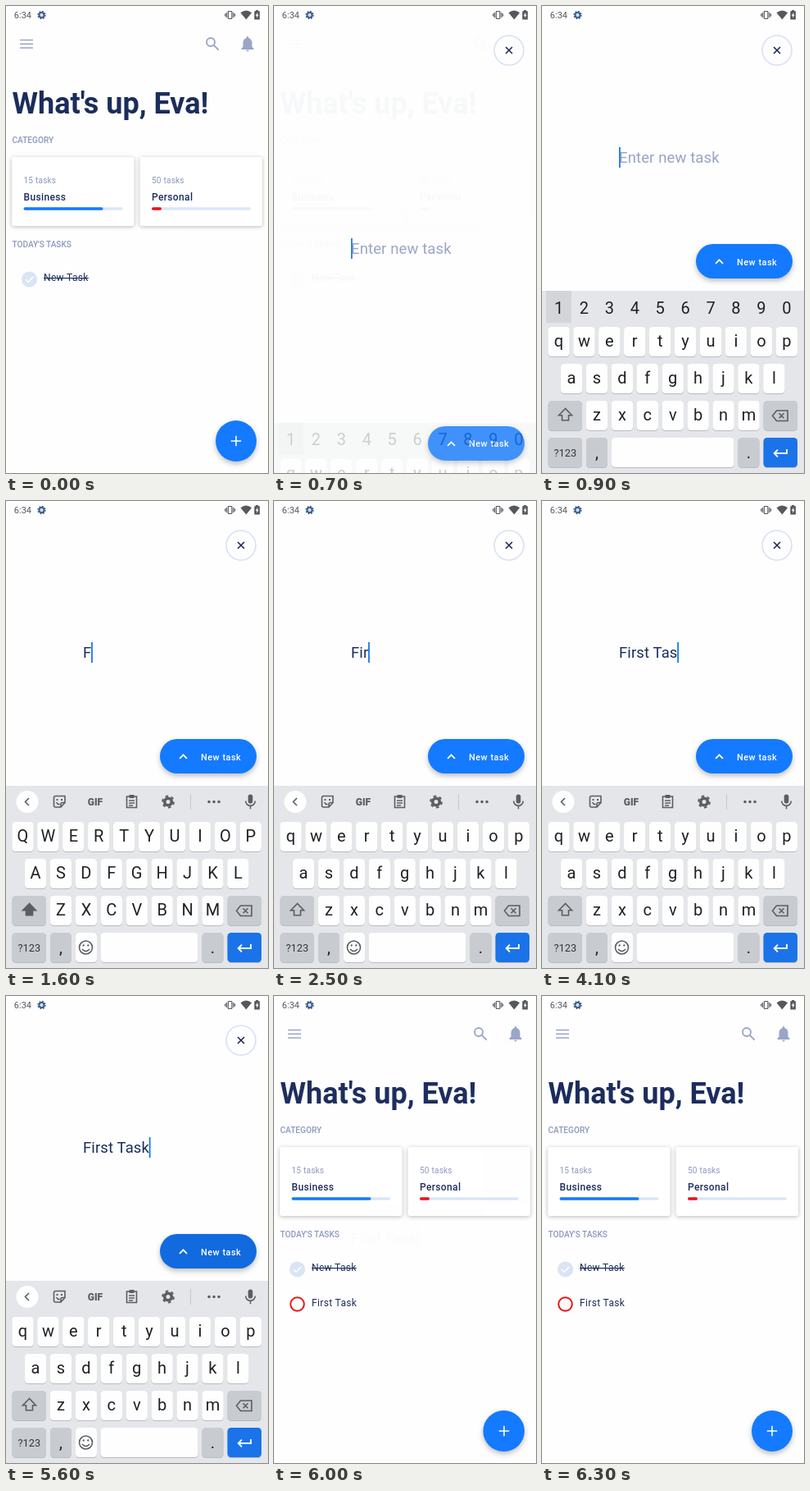
Write an HTML page that moves like this. It is 320 by 569 pixels and loops after 8 s.

```html
<!DOCTYPE html>
<html lang="en">
<head>
<meta charset="utf-8">
<title>Task list</title>
<style>
  html, body { margin: 0; height: 100%; overflow: hidden; background: #fdfefd; }
  svg { display: block; width: 100vw; height: 100vh; font-family: Roboto, sans-serif; }
  text { white-space: pre; }
  .line { fill: none; stroke-width: 1.6; }
  .round { stroke-linecap: round; }
  .navy { fill: #1c2c5c; }
  .muted { fill: #8c99bd; }
  .label { font-size: 10.1px; font-weight: 500; }
  .count { font-size: 10.1px; letter-spacing: .2px; }
  .item { font-size: 12px; letter-spacing: .35px; }
  .entry { font-size: 18.5px; letter-spacing: .12px; }
  .mid { text-anchor: middle; }
  .key { font-size: 20px; fill: #1f2124; text-anchor: middle; }
  .hint { font-size: 8.5px; fill: #55585c; text-anchor: middle; }
  .tool { fill: none; stroke: #5a5e63; stroke-width: 1.6; }
  .solid { fill: #5a5e63; }
  .card { fill: #fff; filter: drop-shadow(0 1px 2.5px rgba(0, 0, 0, .28)); }
  #fab { filter: drop-shadow(0 3px 3px rgba(0, 0, 0, .25)); }
</style>
</head>
<body>
<svg viewBox="0 0 320 569" preserveAspectRatio="none">
  <rect width="320" height="569" fill="#fdfefd"/>

  <g id="home">
    <path class="line" stroke="#9aa5c8" d="M17 41.5h16M17 46.3h16M17 51h16"/>
    <g class="line" stroke="#9aa5c8" style="stroke-width:1.9">
      <circle cx="250" cy="44" r="5"/><path d="M253.7 47.7l6 6"/>
    </g>
    <path fill="#9aa5c8" d="M287.5 53v-1.3l2-2v-5c0-3 1.700-5.200 4.200-5.800v-.6a1.300 1.300 0 0 1 2.600 0v.6c2.500.6 4.200 2.800 4.200 5.800v5l2 2V53zM293.200 53.800h3.600a1.800 1.800 0 0 1-3.600 0z"/>
    <text class="navy" x="7.500" y="131" font-size="36" font-weight="700">What's up, Eva!</text>
    <text class="muted label" x="7.500" y="167">CATEGORY</text>
    <g id="cards"></g>
    <text class="muted label" x="7.500" y="294">TODAY'S TASKS</text>
    <circle cx="28.500" cy="333" r="9.500" fill="#dae4f5"/>
    <path class="line" stroke="#fff" d="M24 333.200l3.200 3.200 6-6.400"/>
    <text class="navy item" x="46" y="335.300" text-decoration="line-through">New Task</text>
    <g id="added">
      <circle class="line" cx="28.500" cy="375.500" r="8.300" stroke="#ec1111" style="stroke-width:2"/>
      <text class="navy item" x="46" y="378">First Task</text>
    </g>
  </g>

  <g id="page">
    <rect width="320" height="569" fill="#fdfefd"/>
    <circle class="line" cx="287" cy="54" r="18" stroke="#dcdff5"/>
    <path class="line" stroke="#1c2555" d="M283 50l8 8m0-8l-8 8"/>
    <g id="field">
      <text id="prompt" class="entry" x="94" y="302.300" fill="#99a3c6">Enter new task</text>
      <text id="typed" class="entry navy" x="94" y="302.300"></text>
      <rect id="cursor" y="283" width="1.800" height="25" fill="#1a78e8"/>
    </g>
  </g>

  <g id="status">
    <text x="9.800" y="15" font-size="11" fill="#55585c">6:34</text>
    <circle cx="43.500" cy="11" r="3.100" fill="#c6dcf5" stroke="#355582" stroke-width="1.800"/>
    <circle cx="43.500" cy="11" r="4.600" fill="none" stroke="#355582" stroke-width="1.300" stroke-dasharray="1.800 1.812"/>
    <g fill="none" stroke="#55585c" stroke-width="1.200">
      <rect x="271.300" y="6.500" width="4.600" height="9" rx=".8"/>
      <path d="M269.300 8v6M267.700 9.500v3M277.900 8v6M279.500 9.500v3"/>
    </g>
    <path fill="#55585c" d="M286.500 8.300q6.800-5.400 13.600 0L293.300 16.500zM303.300 6.300h1.800V5h3v1.300h1.800V16.500h-6.600z"/>
    <path fill="#fff" d="M307.300 7.800l-2.500 4h1.500v3l2.300-4.100h-1.300z"/>
  </g>

  <g id="fab">
    <rect id="fabShape" fill="#147aff"/>
    <rect id="fabPress" fill="#000"/>
    <path id="plus" class="line" stroke="#fff" d="M274.700 530h12.600M281 523.700v12.600"/>
    <g id="fabLabel">
      <path class="line" stroke="#fff" style="stroke-width:1.800" d="M212 535.800l4.500-4.500 4.500 4.500"/>
      <text x="238" y="537.500" font-size="10.900" font-weight="500" letter-spacing=".5" fill="#fff">New task</text>
    </g>
  </g>

  <g id="keyboard">
    <rect y="347" width="320" height="222" fill="#e4e6ea"/>
    <g id="numbers"><rect x="5" y="347" width="31" height="39" fill="#d3d5d9"/></g>
    <g id="toolbar">
      <circle cx="26" cy="366.500" r="13.500" fill="#fdfefd"/>
      <path class="tool" d="M28 362l-4.500 4.500 4.500 4.500"/>
      <path class="tool" d="M60.500 359.500h11.500v8l-5 5.500h-6.500a2 2 0 0 1-2-2v-9.500a2 2 0 0 1 2-2zM72 367.500h-3a2 2 0 0 0-2 2v3.500M61.500 367q1.500 3 4 2.500"/>
      <path class="solid" d="M61.500 363h2v2h-2zM67 363h2v2h-2z"/>
      <text class="solid mid" x="109" y="370.500" font-size="12" font-weight="900">GIF</text>
      <path class="tool" d="M147.500 360h12v13.500h-12zM150 365h7M150 368h7M150 371h5"/>
      <path class="solid" d="M150.500 358h6v4h-6z"/>
      <circle class="tool" cx="198" cy="366.500" r="4.300" style="stroke-width:3.600"/>
      <circle class="tool" cx="198" cy="366.500" r="6.900" stroke-dasharray="3.600 3.625" style="stroke-width:2"/>
      <path class="tool" d="M225.500 357v19" style="stroke:#c3c6ca;stroke-width:1"/>
      <path class="tool round" d="M248 366.500h0M254 366.500h0M260 366.500h0" style="stroke-width:3.600"/>
      <rect class="solid" x="295.700" y="357.500" width="5.600" height="11" rx="2.800"/>
      <path class="tool" d="M292.700 365.500a5.800 5.800 0 0 0 11.600 0M298.500 371.300v4"/>
    </g>
    <g id="keys"></g>
    <path id="shift" class="tool" d="M28.500 490.500l-8 8.300h4v6h8v-6h4z"/>
    <path class="tool" d="M286.500 493h13.500v12.500h-13.500l-5-6.250zM289.500 496.300l6 6m0-6l-6 6"/>
    <text class="mid" x="28.300" y="549" font-size="12.800" fill="#33363a">?123</text>
    <text class="key" x="67" y="551" font-size="17">,</text>
    <text class="key" x="252.500" y="551" font-size="17">.</text>
    <path class="line" stroke="#fff" style="stroke-width:1.900" d="M299 540v5h-15M288 540.700l-4.300 4.300 4.300 4.300"/>
    <g id="emoji">
      <circle class="tool" cx="97.500" cy="544" r="8"/>
      <path class="tool" d="M93 546q4.500 5 9 0"/>
      <path class="tool round" d="M94.700 541.500h0M100.300 541.500h0" style="stroke-width:2.300"/>
    </g>
  </g>
</svg>

<script>
const LOOP = 8000;
const PITCH = 30.92;
const $ = id => document.getElementById(id);
const add = (id, markup) => $(id).insertAdjacentHTML('beforeend', markup);
const set = (id, attrs) => Object.entries(attrs).forEach(([k, v]) => $(id).setAttribute(k, v));
const mix = (a, b, p) => a + (b - a) * p;
const ease = (t, start, end) => {
  const x = Math.min(1, Math.max(0, (t - start) / (end - start)));
  return x * x * (3 - 2 * x);
};

function card(x, width, count, name, done, color) {
  const left = x + 14.5, bar = (length, stroke) =>
    `<path class="round" stroke="${stroke}" stroke-width="3.6" d="M${left + 1.8} 247h${length - 3.6}"/>`;
  add('cards', `<rect class="card" x="${x}" y="184" width="149.500" height="84" rx="3"/>
    <text class="muted count" x="${left}" y="216">${count} tasks</text>
    <text class="navy item" font-weight="500" x="${left}" y="237">${name}</text>
    ${bar(width, '#d9e6f8')}${bar(done, color)}`);
}
card(7, 121, 15, 'Business', 97, '#147aff');
card(163.5, 121, 50, 'Personal', 12, '#f20d14');

function key(x, y, width, fill = '#fdfefd', id = '') {
  add('keys', `<rect x="${x}" y="${y + 1}" width="${width}" height="36" rx="4.500" fill="#b9bcc1" class="${id}"/>
    <rect x="${x}" y="${y}" width="${width}" height="36" rx="4.500" fill="${fill}" class="${id}"/>`);
}
[['qwertyuiop', 20.5, 391], ['asdfghjkl', 36, 436], ['zxcvbnm', 67, 481]].forEach(([row, start, y]) =>
  [...row].forEach((letter, i) => {
    const x = start + i * PITCH;
    key(x - 13.2, y, 26.4);
    add('keys', `<text class="key letter" x="${x}" y="${y + 24.3}">${letter}</text>`);
  }));
for (let i = 0; i < 10; i++) {
  const x = 20.5 + i * PITCH, digit = (i + 1) % 10;
  add('numbers', `<text class="key" x="${x}" y="374.500">${digit}</text>`);
  add('toolbar', `<text class="hint" x="${x + 8.8}" y="401">${digit}</text>`);
}
const GREY = '#c8ccd0';
key(7.5, 481, 41.5, GREY);
key(270.5, 481, 41.5, GREY);
key(7.5, 526, 41.5, GREY);
key(54, 526, 26, GREY);
key(239.5, 526, 26, GREY);
key(270.5, 526, 41.5, '#1a73e8');
key(85, 526, 149.5, '#fdfefd', 'wide');
key(85, 526, 26, '#fdfefd', 'narrow');
key(115.5, 526, 119, '#fdfefd', 'narrow');

const TEXT = 'First Task';
const STROKES = [1600, 2000, 2500, 2900, 3100, 3400, 3800, 3900, 4100, 4400];
const letters = document.querySelectorAll('.letter');
const show = (selector, on) => document.querySelectorAll(selector)
  .forEach(node => node.style.display = on ? '' : 'none');

function draw(t) {
  const page = ease(t, 430, 730) - ease(t, 5690, 6020);
  const morph = ease(t, 450, 700) - ease(t, 5690, 6020);
  const keyboard = ease(t, 633, 830) - ease(t, 5720, 5960);
  const inset = ease(t, 700, 850) - ease(t, 5720, 5960);

  $('page').style.opacity = page;
  show('#page', page > 0);
  show('#added', t >= 5600);

  const typed = TEXT.slice(0, STROKES.filter(at => t >= at).length);
  $('typed').textContent = typed;
  show('#prompt', !typed);
  set('field', { transform: `translate(0 ${-111 * inset})` });
  set('cursor', { x: 94 + (typed ? $('typed').getComputedTextLength() - .3 : 0) });

  const height = mix(50, 42, morph);
  const shape = {
    x: mix(256, 188, morph), y: mix(505, 512 - 222 * inset, morph),
    width: mix(50, 118, morph), height, rx: height / 2
  };
  set('fabShape', shape);
  set('fabPress', { ...shape, opacity: t >= 5600 ? .13 * (1 - ease(t, 5650, 5950)) : 0 });
  set('plus', { opacity: 1 - morph });
  set('fabLabel', { opacity: morph, transform: `translate(0 ${shape.y - 512})` });

  show('#keyboard', keyboard > 0);
  $('keyboard').style.opacity = Math.min(1, Math.max(0, keyboard * 1.2 - .12));
  set('keyboard', { transform: `translate(0 ${222 * (1 - keyboard)})` });
  const ready = t >= 1000;
  show('#numbers, .wide', !ready);
  show('#toolbar, #emoji, .narrow', ready);

  const caps = (t >= 1400 && t < 1800) || (t >= 3600 && t < 3900);
  letters.forEach(node => {
    node.textContent = caps ? node.textContent.toUpperCase() : node.textContent.toLowerCase();
  });
  $('shift').style.fill = caps ? '#5a5e63' : 'none';
}

const start = performance.now();
function tick() {
  draw((performance.now() - start) % LOOP);
  requestAnimationFrame(tick);
}
tick();
</script>
</body>
</html>
```
